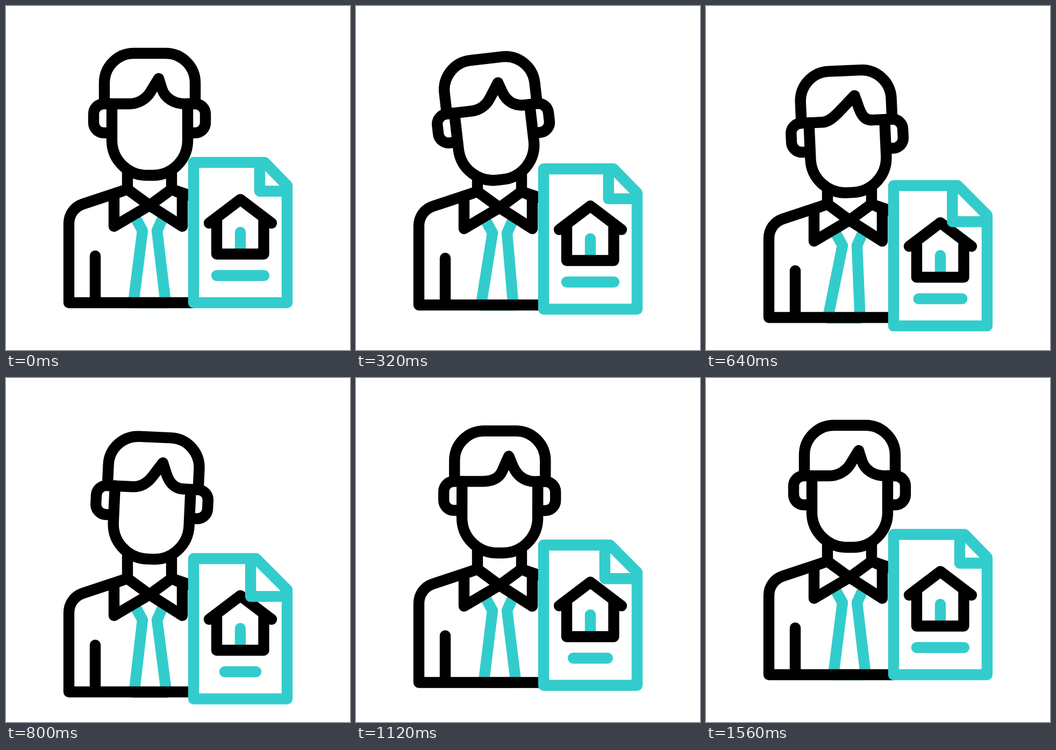
These frames come from a looping animation (640x640 px, 1680 ms). An HTML page without scripts:

```html
<!DOCTYPE html>
<html lang="en">
<head>
<meta charset="utf-8">
<title>Estate agent with contract</title>
<style>
  html, body { margin: 0; width: 100%; height: 100%; overflow: hidden; background: #fff; }
  svg { display: block; width: 100%; height: 100%; }
  path { fill: none; stroke: #000; stroke-width: 20.4; stroke-linecap: round; stroke-linejoin: round; }
  .teal { stroke: #3cc; }
  .paper { fill: #fff; }

  .body, .head, .tie, .fringe, .doc, .sheet, .fold, .line {
    animation: 1680ms cubic-bezier(.3333, 0, .6667, 1) infinite;
  }
  .body { animation-name: sink; }
  .head { animation-name: nod, tilt; transform-origin: 267px 309px; }
  .tie { animation-name: swing; }
  .fringe { animation-name: sway; animation-timing-function: linear; }
  .doc { animation-name: drop; }
  .sheet { animation-name: clip; }
  .fold { animation-name: fold; }
  .line { animation-name: shrink; }

  @keyframes sink {
    0%, 11.07%, 82%, 100% { translate: 0 0; }
    46.43%, 49.5% { translate: 0 32px; }
  }
  /* relative to the body */
  @keyframes nod {
    0%, 7.14%, 72.6%, 100% { translate: 0 0; }
    32.1% { translate: 0 9px; }
    54.8% { translate: 0 -16px; }
  }
  @keyframes tilt {
    0%, 7.14%, 68.5%, 100% { rotate: 0deg; }
    24.3% { rotate: -8.4deg; }
    52.1% { rotate: 3.4deg; }
  }
  @keyframes swing {
    0%, 11.3%, 70.2%, 100% { d: path("M243 398L254 418L237 552L297 552L281 418L290 398"); }
    32.1% { d: path("M243 398L254 418L223 553L283 553L281 418L290 398"); }
    53.6% { d: path("M243 398L254 418L242 553L302 553L281 418L290 398"); }
  }
  @keyframes sway {
    0%, 11.9%, 92%, 100% { d: path("M197 182L229 182C245 182 260 174 268 161L284 135L290 154C296 172 313 182 333 182L342 182"); }
    26.2% { d: path("M197 182L227 182C243 182 256 175 265 161L284 135L290 153C297 173 308 182 325 182L342 182"); }
    38.1% { d: path("M197 182L222 182C232 182 243 175 258 160L284 135L291 158C296 174 302 182 315 182L342 182"); }
    57.1% { d: path("M197 182L238 182C255 182 268 176 273 163L284 135L292 153C300 169 312 182 333 182L342 182"); }
    73.8% { d: path("M197 182L233 182C250 182 264 176 270 164L284 135L291 153C298 171 312 182 333 182L342 182"); }
  }
  @keyframes drop {
    0%, 7.14%, 81.5%, 100% { translate: 0 0; }
    42.44%, 49.35% { translate: 0 45px; }
  }
  @keyframes clip {
    0%, 10.48%, 85.8%, 100% { d: path("M349 291L481 291L523 334L523 552L349 552Z"); }
    49.2% { d: path("M349 291L465 291L523 349L523 552L349 552Z"); }
  }
  @keyframes fold {
    0%, 10.48%, 85.8%, 100% { d: path("M472 291L472 344.5L523 344.5"); }
    49.2% { d: path("M455 291L455 361.5L523 361.5"); }
  }
  @keyframes shrink {
    0%, 31.5%, 80.4%, 100% { d: path("M392 501.5L480 501.5"); }
    56% { d: path("M412.5 501.5L459.5 501.5"); }
  }
</style>
</head>
<body>
<svg viewBox="0 0 640 640">
  <g class="body">
    <path class="teal tie" d="M243 398L254 418L237 552L297 552L281 418L290 398"/>
    <path d="M349 552H117V405C117 388 127 374 143 368.5L226 341V275M308 275V341L349 355M166 465V552"/>
    <path class="paper" d="M226 341L201 350V410L267 371L308 341L328 350V410L267 371Z" fill-rule="evenodd"/>
    <g class="head">
      <path class="paper" d="M183 182V143A55 55 0 0 1 238 88H297A55 55 0 0 1 352 143V182"/>
      <path d="M197 182H182A19 19 0 0 0 163 201V217A19 19 0 0 0 182 236H197M338 182H352A19 19 0 0 1 371 201V217A19 19 0 0 1 352 236H338"/>
      <path class="paper" d="M197 182V250A65 65 0 0 0 262 315H273A65 65 0 0 0 338 250V182"/>
      <path class="fringe" d="M197 182L229 182C245 182 260 174 268 161L284 135L290 154C296 172 313 182 333 182L342 182"/>
    </g>
  </g>
  <g class="doc">
    <path class="teal paper sheet" d="M349 291L481 291L523 334L523 552L349 552Z"/>
    <path class="teal" d="M436 421V455"/>
    <path d="M378 404L436 360L494 404M392 400V461.5H479.5V400"/>
    <path class="teal line" d="M392 501.5L480 501.5"/>
    <path class="teal fold" d="M472 291L472 344.5L523 344.5"/>
  </g>
</svg>
</body>
</html>
```
